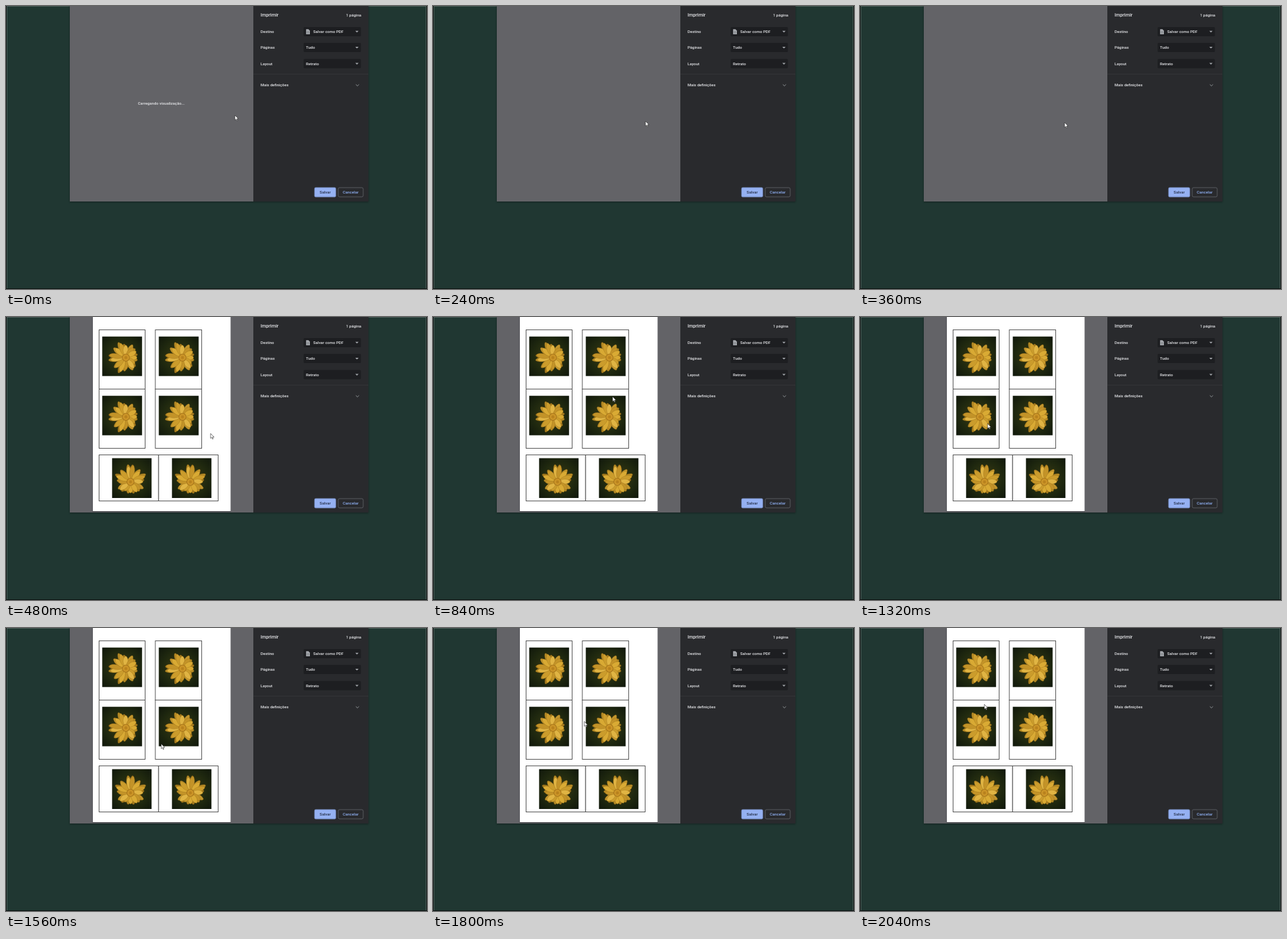
These frames come from a looping animation (640x430 px, 2160 ms). An HTML page:

```html
<!DOCTYPE html>
<html lang="pt">
<head>
<meta charset="utf-8">
<title>Imprimir</title>
<style>
html, body { margin: 0; width: 100%; height: 100%; overflow: hidden; background: #203732; }
svg { display: block; width: 640px; height: 430px; }
text { font: 500 6px Roboto, Arial, sans-serif; fill: #e4e5e8; }
.title { font-size: 7.2px; }
.end { text-anchor: end; }
.mid { text-anchor: middle; }
.field { fill: #1d1e21; }
.card { fill: #fff; stroke: #555; stroke-width: 1; }

/* 18 equal beats of 120 ms */
.loading, .page, .cursor { animation: 2160ms step-end infinite; }
.loading { animation-name: loading; }
.page { animation-name: page; }
.cursor { animation-name: roam; }
@keyframes loading { 0% { opacity: 1; } 11.11%, 100% { opacity: 0; } }
@keyframes page { 0% { opacity: 0; } 22.22%, 100% { opacity: 1; } }
@keyframes roam {
  0% { transform: translate(348px, 166px); }
  5.55% { transform: translate(340px, 170px); }
  11.11% { transform: translate(323px, 175px); }
  16.66%, 22.22% { transform: translate(311px, 177px); }
  27.77% { transform: translate(306px, 168px); }
  33.33% { transform: translate(293px, 143px); }
  38.88% { transform: translate(273px, 121px); }
  44.44% { transform: translate(240px, 114px); }
  49.99% { transform: translate(205px, 122px); }
  55.55% { transform: translate(192px, 142px); }
  61.11% { transform: translate(194px, 162px); }
  66.66% { transform: translate(212px, 174px); }
  72.22% { transform: translate(236px, 176px); }
  77.77% { transform: translate(240px, 162px); }
  83.33% { transform: translate(230px, 142px); }
  88.88% { transform: translate(210px, 125px); }
  94.44%, 100% { transform: translate(189px, 116px); }
}
</style>
</head>
<body>
<svg viewBox="0 0 640 430">
  <defs>
    <radialGradient id="leaf" cx=".5" cy=".5" r=".7">
      <stop offset="0" stop-color="#3a3a12"/>
      <stop offset=".6" stop-color="#1f280f"/>
      <stop offset="1" stop-color="#10170b"/>
    </radialGradient>
    <radialGradient id="disc">
      <stop offset="0" stop-color="#b07a1a"/>
      <stop offset=".6" stop-color="#cc9426"/>
      <stop offset="1" stop-color="#a4731a"/>
    </radialGradient>
    <filter id="shade" x="-5%" y="-5%" width="110%" height="110%">
      <feGaussianBlur stdDeviation="1.5"/>
    </filter>
    <g id="photo">
      <rect width="60.5" height="60" fill="url(#leaf)"/>
      <g id="petals"></g>
      <circle cx="36" cy="32" r="6" fill="url(#disc)"/>
      <circle cx="36" cy="32" r="3.8" fill="none" stroke="#dcaa38" stroke-width=".9" stroke-dasharray="1 1"/>
    </g>
    <path id="caret" d="M-2.5-1.2h5L0 1.3z" fill="#a6a9ae"/>
  </defs>

  <rect width="640" height="430" fill="#203732"/>
  <path d="M0 .5H640M1.5 0V429M638.5 0V429" stroke="#4c5d58" fill="none"/>
  <path d="M.5 0V430M639.5 0V430M0 429.5H640" stroke="#0b1211" fill="none"/>

  <rect x="97" y="-4" width="454" height="302" fill="#000" opacity=".35" filter="url(#shade)"/>
  <rect x="97" width="279.5" height="297" fill="#636367"/>
  <rect x="376" width="175" height="297" fill="#292a2d"/>

  <text class="loading mid" x="236" y="150.3">Carregando visualização...</text>

  <g class="page">
    <rect x="131.5" width="210.5" height="296" fill="#45464a"/>
    <rect x="132" width="209.5" height="295" fill="#fff"/>
    <rect class="card" x="141.5" y="19.5" width="70" height="90"/>
    <rect class="card" x="141.5" y="109.5" width="70" height="90"/>
    <rect class="card" x="227" y="19.5" width="70.5" height="90"/>
    <rect class="card" x="227" y="109.5" width="70.5" height="90"/>
    <rect class="card" x="141.5" y="209.5" width="90.5" height="70"/>
    <rect class="card" x="232" y="209.5" width="90.5" height="70"/>
    <use href="#photo" x="146.3" y="29.7"/>
    <use href="#photo" x="232.3" y="29.7"/>
    <use href="#photo" x="146.3" y="119.7"/>
    <use href="#photo" x="232.3" y="119.7"/>
    <use href="#photo" transform="translate(221.3 214.5) rotate(90)"/>
    <use href="#photo" transform="translate(312.3 214.5) rotate(90)"/>
  </g>

  <text class="title" x="387" y="16.3">Imprimir</text>
  <text class="end" x="540" y="16">1 página</text>
  <text x="387" y="41">Destino</text>
  <text x="387" y="65.3">Páginas</text>
  <text x="387" y="89.7">Layout</text>
  <rect class="field" x="452.5" y="32" width="87" height="14" rx="1.5"/>
  <rect class="field" x="452.5" y="56" width="87" height="14" rx="1.5"/>
  <rect class="field" x="452.5" y="80.5" width="87" height="14" rx="1.5"/>
  <path d="M456.2 35.2h3.6l2.2 2.2v5.6h-5.8z" fill="#a6a9ae"/>
  <path d="M457.4 39h3.4M457.4 41h3.4" stroke="#5c5e63" stroke-width=".6"/>
  <text x="467" y="41">Salvar como PDF</text>
  <text x="456" y="65.3">Tudo</text>
  <text x="456" y="89.7">Retrato</text>
  <use href="#caret" x="533.5" y="39"/>
  <use href="#caret" x="533.5" y="63.3"/>
  <use href="#caret" x="533.5" y="87.6"/>
  <path d="M376 103.5H551" stroke="#343538"/>
  <text x="387" y="122.3">Mais definições</text>
  <path d="M531.8 119.2l2.4 2.3 2.4-2.3" fill="none" stroke="#9a9da2" stroke-width=".9"/>

  <rect x="468.7" y="275.5" width="33" height="15" rx="2.2" fill="#7f97d0"/>
  <rect x="469.7" y="276.4" width="31" height="13.2" rx="1.6" fill="#95b1f2"/>
  <text class="mid" x="485.2" y="285" style="fill:#26314a">Salvar</text>
  <rect x="505" y="276" width="38" height="14" rx="2" fill="none" stroke="#5c6066" stroke-width=".9"/>
  <text class="mid" x="524" y="285" style="fill:#8fb0f4">Cancelar</text>

  <path class="cursor" d="M0 0V7.4L1.7 5.9 2.9 8.5 4.1 8 2.9 5.4H5.3Z" fill="#fff" stroke="#222" stroke-width=".6"/>
</svg>
<script>
const petals = document.getElementById("petals");

// One ring of petals; lengths and angles vary by a fixed wave.
function ring(count, length, width, turn, colors) {
  for (let i = 0; i < count; i++) {
    const angle = turn + i * 360 / count + 5 * Math.sin(i * 2.4);
    const lean = 2.5 * Math.cos(angle * Math.PI / 180);
    const r = length - lean + 2 * Math.sin(i * 3.7 + turn);
    const petal = document.createElementNS("http://www.w3.org/2000/svg", "path");
    petal.setAttribute("d", `M2 0C${r * .4} ${-width} ${r * .8} ${-width} ${r} -1Q${r + .8} 0 ${r} 1C${r * .8} ${width} ${r * .4} ${width} 2 0`);
    petal.setAttribute("transform", `translate(35 32) rotate(${angle})`);
    petal.setAttribute("fill", colors[i % colors.length]);
    petal.setAttribute("stroke", "#8f6716");
    petal.setAttribute("stroke-width", ".3");
    petals.append(petal);
  }
}

ring(14, 22, 4.6, 12, ["#b58a25", "#a47a1e", "#c2962e"]);
ring(13, 20, 4.8, 0, ["#d9aa34", "#cb9c2c", "#e0b443", "#c39328"]);
</script>
</body>
</html>
```
